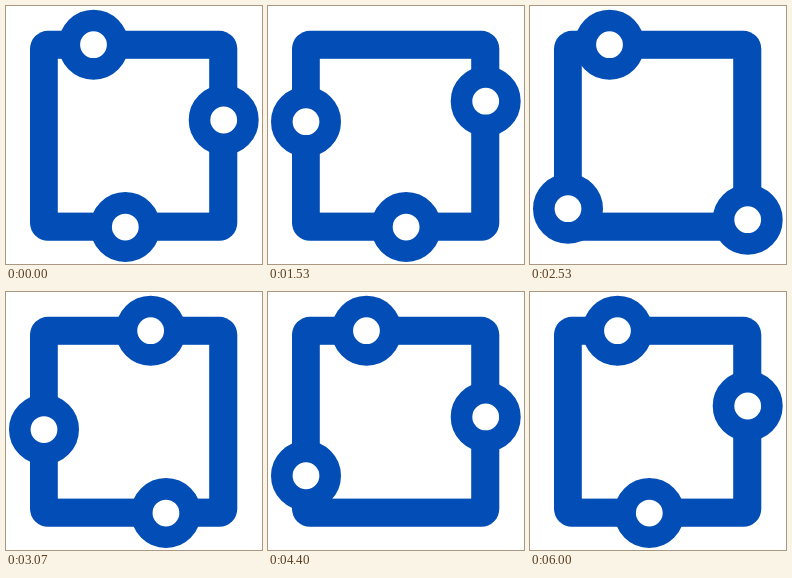
Write an HTML page that moves like this. It is 256 px wide and 258 px high and loops after 6070 ms.

```html
<!DOCTYPE html>
<html lang="en">
<head>
<meta charset="utf-8">
<title>Beads on a square</title>
<style>
  html, body { margin: 0; width: 100%; height: 100%; overflow: hidden; background: #fff; }
  svg { display: block; width: 256px; height: 258px; }
  .frame { fill: #024eb6; }
  .hollow { fill: #fff; }
  .bead { fill: #fff; stroke: #024eb6; stroke-width: 21.6; }
</style>
</head>
<body>
<svg viewBox="0 0 256 258">
  <rect class="frame" x="24" y="24.8" width="207.3" height="210" rx="18"/>
  <rect class="hollow" x="51.8" y="52.8" width="151.4" height="153.8"/>
  <circle class="bead" r="24.2"/>
  <circle class="bead" r="24.2"/>
  <circle class="bead" r="24.2"/>
</svg>
<script>
  const LOOP = 6070, FPS = 15, LAST = 90;
  const LEFT = 38, TOP = 38.7, WIDTH = 179.7, HEIGHT = 182.4;
  const LAP = 2 * (WIDTH + HEIGHT);
  const GAP = 205.5;
  // [step, distance travelled clockwise from the top left corner]
  const PACE = [[0, 49.5], [11, 137.3], [23, 236.2], [38, 354.7], [54, 485], [77, 665.5], [LAST, 49.5 + LAP]];
  const beads = document.querySelectorAll('.bead');

  function travelled(step) {
    const i = Math.max(1, PACE.findIndex(([s]) => s >= step));
    const [s0, d0] = PACE[i - 1], [s1, d1] = PACE[i];
    return d0 + (d1 - d0) * (step - s0) / (s1 - s0);
  }

  function pointAt(distance) {
    let d = distance % LAP;
    if (d < WIDTH) return [LEFT + d, TOP];
    d -= WIDTH;
    if (d < HEIGHT) return [LEFT + WIDTH, TOP + d];
    d -= HEIGHT;
    if (d < WIDTH) return [LEFT + WIDTH - d, TOP + HEIGHT];
    return [LEFT, TOP + HEIGHT - (d - WIDTH)];
  }

  function draw(time) {
    const step = Math.min(LAST, Math.floor((time % LOOP + 3.5) * FPS / 1000));
    const head = travelled(step);
    beads.forEach((bead, i) => {
      const [x, y] = pointAt(head + i * GAP);
      bead.setAttribute('cx', x);
      bead.setAttribute('cy', y);
    });
  }

  const start = performance.now();
  function tick() {
    draw(performance.now() - start);
    requestAnimationFrame(tick);
  }
  tick();
</script>
</body>
</html>
```
